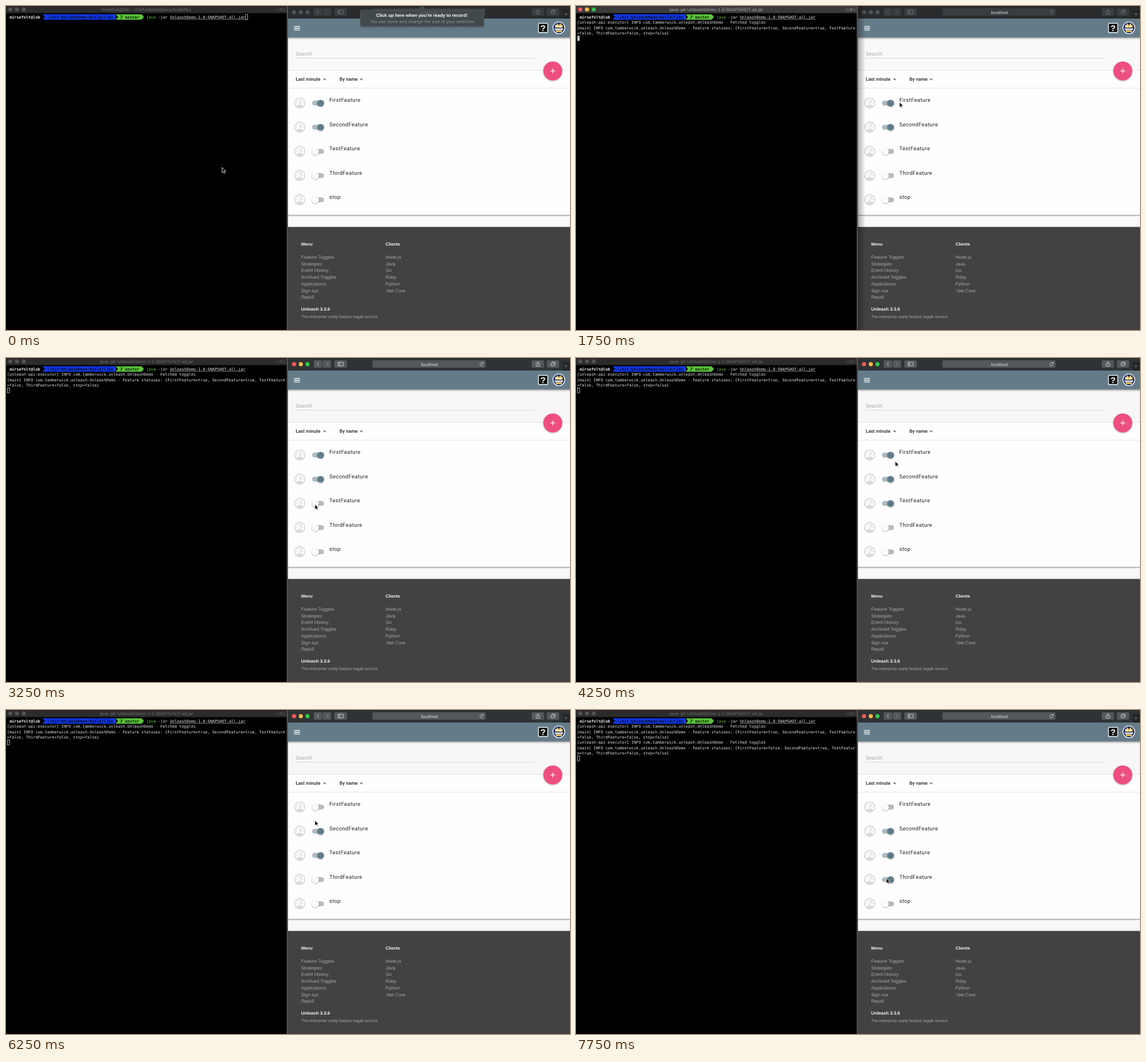
An HTML page that plays this animation: 986 by 568 pixels, repeating every 8 s.

```html
<!DOCTYPE html>
<html lang="en">
<head>
<meta charset="utf-8">
<title>Feature toggle demo</title>
<style>
  html, body { margin: 0; width: 100%; height: 100%; overflow: hidden; background: #000; }
  svg { display: block; width: 986px; height: 568px; text-rendering: geometricPrecision;
        font-family: "Liberation Sans", Arial, sans-serif; }
  text { white-space: pre; }
  .mono { font: 6.852px "DejaVu Sans Mono", monospace; fill: #e4e4e4; }
  .bold { font-weight: 700; }
  .mid { text-anchor: middle; }
  .title { font-size: 8px; fill: #6f6f6f; }
  .feature { font: 9.36px Roboto, sans-serif; letter-spacing: .41px; fill: #212121; }
  .filter { font: 500 8.19px Roboto, sans-serif; fill: #212121; }
  .search { font: 9.4px Roboto, sans-serif; fill: #adadad; }
  .link { font-size: 8.1px; fill: #a8a8a8; }
  .head { font-size: 7.6px; font-weight: 700; fill: #f5f5f5; }
  .btn { fill: #3a3d3f; }
  .icon { fill: none; stroke: #77797b; stroke-width: .9; }
  .light { fill: #515456; }
  #termBar { fill: #2b2b2b; }
  #toolbar { fill: #292b2d; }
  #url { font-size: 7.5px; fill: #dedede; }
  .bg { fill: #f9f9f9; }
  #edge { opacity: 0; }

  .termOn #termBar { fill: #3b3b3b; }
  .termOn .title { fill: #a9a9a9; }
  .termOn .t .red, .webOn .w .red { fill: #fc5b56; }
  .termOn .t .amber, .webOn .w .amber { fill: #fdbc40; }
  .termOn .t .green, .webOn .w .green { fill: #34c84a; }
  .termOn #edge { opacity: 1; }
  .webOn #toolbar { fill: #303335; }
  .webOn .btn { fill: #55585a; }
  .webOn .icon { stroke: #d2d3d4; }
  .webOn .bg { fill: #f8f6f7; }
</style>
</head>
<body>
<svg id="stage" viewBox="0 0 986 568" xmlns="http://www.w3.org/2000/svg">
  <defs>
    <linearGradient id="shadeX"><stop stop-color="#000" stop-opacity=".32"/><stop offset="1" stop-color="#000" stop-opacity="0"/></linearGradient>
    <linearGradient id="shadeY" x2="0" y2="1"><stop stop-color="#000" stop-opacity=".34"/><stop offset="1" stop-color="#000" stop-opacity="0"/></linearGradient>
    <filter id="soft" x="-40%" y="-40%" width="180%" height="190%"><feDropShadow dx="0" dy="1" stdDeviation="1" flood-opacity=".35"/></filter>
    <g id="gauge">
      <circle r="8.9" fill="none" stroke="#dadada" stroke-width="1.9"/>
      <path d="M-6.6 6.3Q-5.6 3.2 0 3.2T6.6 6.3Q4 9.2 0 9.2T-6.6 6.3Z" fill="#dadada"/>
      <path d="M0 2.2L2.8-4.8" stroke="#dadada" stroke-width="1.8" stroke-linecap="round"/>
      <g fill="#dadada"><circle cx="-5.3" cy="-.3" r="1.1"/><circle cx="-3.4" cy="-3.9" r="1.1"/><circle cx="0" cy="-5.5" r="1.1"/><circle cx="5.3" cy="-.3" r="1.1"/></g>
    </g>
  </defs>

  <g id="terminal">
    <rect width="493" height="568"/>
    <rect id="termBar" width="491" height="12.5"/>
    <g class="t" id="termLights"></g>
    <text id="title" class="title mid" x="245.3" y="8.9"></text>
    <text class="title" x="489" y="8.8" text-anchor="end" style="font:7px 'DejaVu Sans',sans-serif" opacity=".75">⌥⌘1</text>
    <path d="M64 14.4H192V24H64L68.1 19.2Z" fill="#1238e6"/>
    <path d="M191.8 14.4H237.1L241.2 19.2 237.1 24H191.8L195.9 19.2Z" fill="#5cc23a"/>
    <path d="M201.3 15.6V23M201.3 20.5Q203.6 20.2 203.6 16.5" fill="none" stroke="#10240a" stroke-width=".9"/>
    <g id="prompt"></g>
    <path d="M286.6 23.2H418.6" stroke="#d8d8d8" stroke-width=".6"/>
    <g id="log1"></g>
    <g id="log2"></g>
    <rect id="caret" width="3.9" height="9"/>
    <rect x="490.8" width="2" height="568" fill="#5a5a5a"/>
  </g>

  <g id="browser">
    <rect class="bg" x="493" width="493" height="568"/>
    <rect x="493" y="112.5" width="493" height="253.5" fill="#fefefe"/>
    <path d="M493 112.5H986M493 144H986" stroke="#e2e2e2"/>
    <rect x="493" y="366" width="493" height="3.5" fill="url(#shadeY)"/>
    <path d="M506 91.5H925" stroke="#d4d4d4"/>
    <text class="search" x="506.5" y="87.3">Search</text>
    <text class="filter" x="506.5" y="131.3">Last minute</text>
    <text class="filter" x="583" y="131.3">By name</text>
    <path d="M554 127.6h6l-3 3zM618 127.6h6l-3 3z" fill="#757575"/>
    <g id="rows"></g>

    <rect x="493" y="387.3" width="493" height="181" fill="#424242"/>
    <g id="footer"></g>

    <rect x="493" y="55" width="493" height="4" fill="url(#shadeY)"/>
    <rect x="493" y="22" width="493" height="33" fill="#647c89"/>
    <path d="M503.5 35.8h10.5M503.5 39h10.5M503.5 42.2h10.5" stroke="#fff" stroke-width="1.3"/>
    <rect x="930.8" y="30.3" width="16.2" height="16.2" rx="1" fill="#111" stroke="#fff" stroke-width="1.3"/>
    <text class="mid bold" x="939" y="43.6" font-size="14.5" fill="#fff">?</text>
    <circle cx="966.5" cy="38.2" r="11" fill="#fff"/>
    <g fill="#20285e"><circle cx="966.5" cy="38.2" r="9.7"/></g>
    <path d="M960 33h3v-2.5h2V33h3v-2.5h2V33h3v5h-13zM961 42.5h11v3h-11z" fill="#f1cf69"/>
    <path d="M962 35h3v2h-3zM968 35h3v2h-3zM959 39.5h15v2.3h-15z" fill="#fff"/>
    <g filter="url(#soft)"><circle cx="955.9" cy="113.8" r="16.6" fill="#ee5081"/></g>
    <path d="M951.8 113.8h8.2M955.9 109.7v8.2" stroke="#fff" stroke-width="1.2"/>

    <rect id="toolbar" x="493" width="493" height="22"/>
    <g class="w" id="webLights"></g>
    <g class="btn">
      <rect x="538" y="4" width="14.8" height="13" rx="2"/><rect x="553.6" y="4" width="14.8" height="13" rx="2"/>
      <rect x="574" y="4" width="22" height="13" rx="2"/><rect x="640.5" y="4" width="198" height="13" rx="2"/>
      <rect x="919" y="4" width="21.5" height="13" rx="2"/><rect x="945.5" y="4" width="21.5" height="13" rx="2"/>
    </g>
    <g class="icon">
      <path d="M547 7.3l-3 3.2 3 3.2"/><path d="M559.8 7.3l3 3.2-3 3.2" opacity=".45"/>
      <path d="M580.5 7.4h9v6.4h-9zM583.7 7.4v6.4M581.5 9h1.2M581.5 10.6h1.2"/>
      <path d="M834 9.2a2.9 2.9 0 1 0 .3 2.4M834.4 7.4v2.2h-2.2"/>
      <path d="M928.3 9.3h-1.5v5h6v-5h-1.5M929.8 11.8V6.3M928 8l1.8-1.8L931.6 8"/>
      <path d="M953 8.8h5v5h-5zM955 8.6V7h5v5h-1.8"/>
    </g>
    <text id="url" class="mid" x="740.3" y="13.6">localhost</text>
    <rect x="973.5" y="7" width="13" height="15" fill="#222425"/>
    <path d="M975.5 14.3h7M979 10.8v7" stroke="#77797b" stroke-width=".8"/>
    <rect id="edge" x="493" y="0" width="13" height="568" fill="url(#shadeX)"/>
  </g>

  <g id="hint">
    <path d="M622 7H721L727.8 0 734.6 7H833Q835.5 7 835.5 9.5V33.5Q835.5 36 833 36H622Q619.5 36 619.5 33.5V9.5Q619.5 7 622 7Z" fill="#43494e" stroke="#5d6368" stroke-width=".7" filter="url(#soft)"/>
    <text class="mid" x="740" y="13.6" font-size="7.5" fill="#5f6569">localhost</text>
    <text class="mid bold" x="727" y="19.4" font-size="7.9" fill="#fff">Click up here when you're ready to record!</text>
    <text class="mid" x="727" y="29.8" font-size="7.95" fill="#8e9499">You can move and change the size of your selection</text>
  </g>

  <path id="mouse" d="M0 0V9.2L2.1 7.3 3.5 10.3 5 9.6 3.7 6.7H6.6Z" fill="#000" stroke="#fff" stroke-width=".8"/>
</svg>
<script>
const LOOP = 8000, COL = 4.125, LINE = 9.35;
const $ = id => document.getElementById(id);
const put = (id, html) => { $(id).innerHTML = html; };
const text = (cls, x, y, s, extra = '') => `<text class="${cls}" x="${x}" y="${y}" ${extra}>${s}</text>`;
const mono = (col, row, s, fill = '#e4e4e4', cls = 'mono') =>
  text(cls, 2 + col * COL, 21.9 + row * LINE, s, `style="fill:${fill}"`);

const lights = (x, y) => ['red', 'amber', 'green'].map((c, i) =>
  `<circle class="light ${c}" cx="${x + i * 11.75}" cy="${y}" r="3.6"/>`).join('');
put('termLights', lights(7.5, 6));
put('webLights', lights(503.6, 10.8));

const jar = 'UnleashDemo-1.0-SNAPSHOT-all.jar';
put('prompt',
  mono(1, 0, 'mirsefolt@lob', '#f2f2f2', 'mono bold') +
  mono(17, 0, '~/Git/UnleashDemo/build/libs', '#050a28', 'mono bold') +
  mono(50, 0, 'master', '#10240a', 'mono bold') +
  mono(59, 0, 'java', '#6cc644') + mono(64, 0, '-jar') + mono(69, 0, jar));

const logger = 'INFO com.tamberwick.unleash.UnleashDemo -';
const log = (row, ...status) => [`[unleash-api-executor] ${logger} Fetched toggles`,
  `[main] ${logger} Feature statuses: ${status[0]}`, status[1]]
  .map((s, i) => mono(0, row + i, s)).join('');
put('log1', log(1, '{FirstFeature=true, SecondFeature=true, TestFeature', '=false, ThirdFeature=false, stop=false}'));
put('log2', log(4, '{FirstFeature=false, SecondFeature=true, TestFeatur', 'e=true, ThirdFeature=false, stop=false}'));

put('rows', ['FirstFeature', 'SecondFeature', 'TestFeature', 'ThirdFeature', 'stop'].map((name, i) =>
  `<g transform="translate(0 ${170 + i * 42.4})">
    <use href="#gauge" x="513.5"/>
    <rect class="track" x="535" y="-4.2" width="21" height="8.6" rx="4.3"/>
    <circle class="knob" cy=".3" r="5.9" filter="url(#soft)"/>
    ${text('feature', 565.2, -1.6, name)}
  </g>`).join(''));

const links = (x, head, items) => text('head', x, 420.3, head) +
  items.map((s, i) => text('link', x, 442.8 + i * 11.75, s)).join('');
put('footer',
  links(516, 'Menu', ['Feature Toggles', 'Strategies', 'Event History', 'Archived Toggles', 'Applications', 'Sign out', 'Repzil']) +
  links(663.5, 'Clients', ['Node.js', 'Java', 'Go', 'Ruby', 'Python', '.Net Core']) +
  text('head', 516, 534.4, 'Unleash 3.3.6', 'style="font-size:7.9px"') +
  text('link', 516, 547, 'The enterprise ready feature toggle service.', 'style="font-size:7.03px"'));

// Each track lists [start time, ...values]; values hold until the next entry.
const pointer = [[0, 377.8, 283], [1500, 509, 181], [1750, 565.5, 168.5], [2000, 566, 168.5], [2250, 555.5, 195.5],
  [2500, 539.5, 223.5], [2750, 539, 255.5], [3000, 540, 256.5], [4250, 558, 181], [4500, 537.5, 173],
  [4750, 536.8, 171.5], [6250, 540, 193.5], [6500, 561.5, 298.5], [7000, 554.5, 298.5], [7250, 542.5, 295]];
const switches = [
  [[0, 1], [4750, .45], [5000, 0]],
  [[0, 1]],
  [[0, 0], [3750, .62], [4000, 1]],
  [[0, 0], [7500, .62], [7750, 1]],
  [[0, 0]]
];
const caretRow = [[0, 0], [1000, 1], [1750, 4], [6750, 7]];
const at = (track, t) => track.findLast(k => k[0] <= t).slice(1);
const mix = (a, b, k) => `rgb(${a.map((v, i) => Math.round(v + (b[i] - v) * k))})`;
const show = (id, on) => $(id).setAttribute('visibility', on ? 'visible' : 'hidden');

const stage = $('stage'), caret = $('caret');
const tracks = document.querySelectorAll('.track'), knobs = document.querySelectorAll('.knob');

function draw(t) {
  const active = t >= 250 && t < 3250;
  stage.setAttribute('class', active ? 'termOn' : t >= 3250 ? 'webOn' : '');
  show('hint', t < 250);
  show('log1', t >= 1750);
  show('log2', t >= 6750);
  $('title').textContent = t < 1000 ? 'mirsefolt@lob: ~/Git/UnleashDemo/build/libs' : 'java -jar ' + jar;

  const [row] = at(caretRow, t);
  caret.setAttribute('x', row ? 2.4 : 418.7);
  caret.setAttribute('y', 14.8 + row * LINE);
  caret.setAttribute('style', active ? 'fill:#c9c9c9' : 'fill:none;stroke:#c9c9c9;stroke-width:.8');

  switches.forEach((track, i) => {
    const [k] = at(track, t);
    tracks[i].setAttribute('fill', mix([186, 186, 186], [174, 187, 194], k));
    knobs[i].setAttribute('fill', mix([250, 250, 250], [96, 123, 137], k));
    knobs[i].setAttribute('cx', 541 + 9 * k);
  });
  $('mouse').setAttribute('transform', `translate(${at(pointer, t)})`);
}

const start = performance.now();
function tick() {
  draw((performance.now() - start) % LOOP);
  requestAnimationFrame(tick);
}
tick();
</script>
</body>
</html>
```
